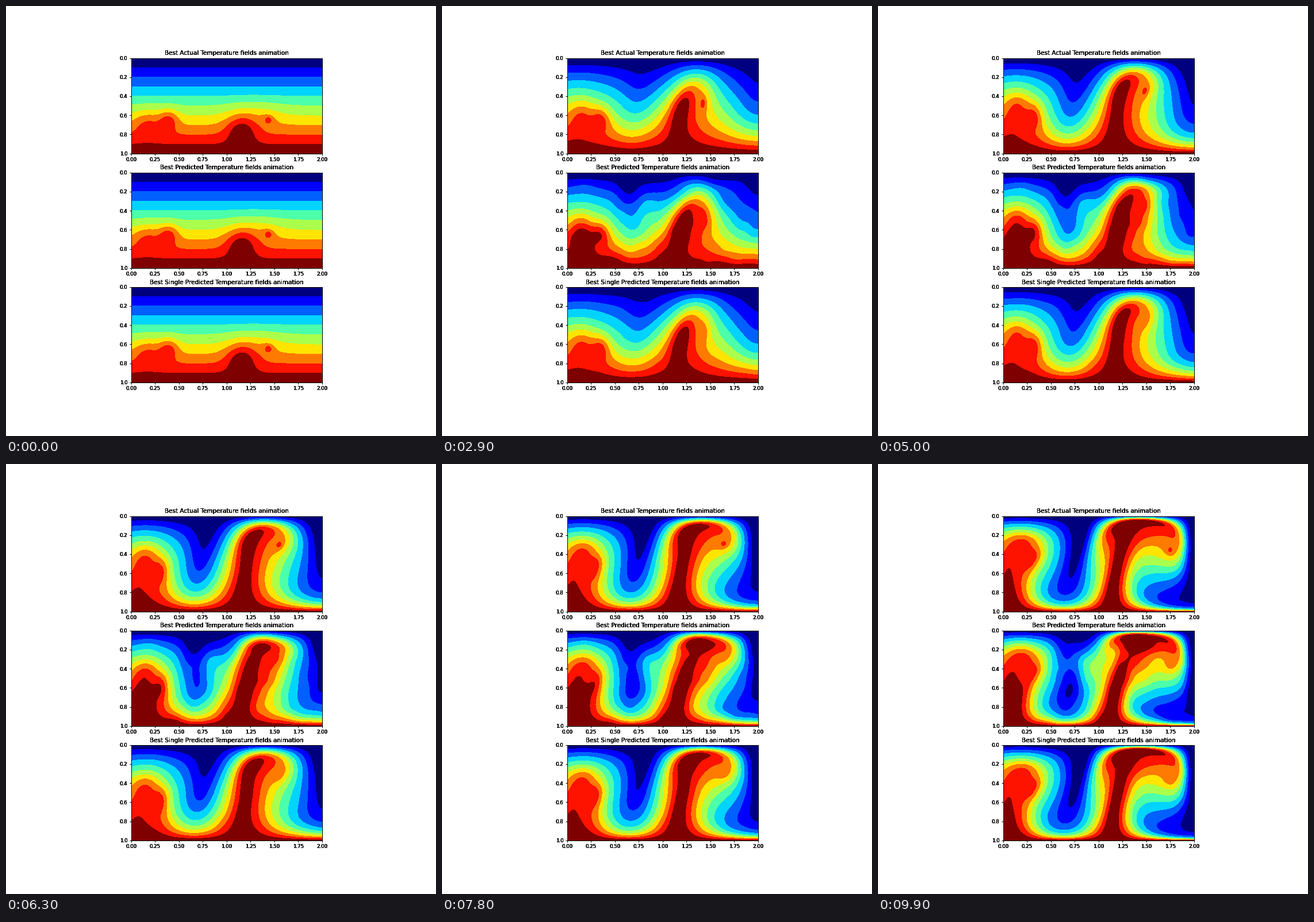
A matplotlib script for the animation above (10000 ms loop, 748x748 px).

```python
import numpy as np
import matplotlib.pyplot as plt
from matplotlib.animation import FuncAnimation
from matplotlib.colors import ListedColormap

SIZE, DPI = 748, 68
FRAMES, INTERVAL = 100, 100
DT = INTERVAL / 1000
NX, NY = 333, 166

xs = (np.arange(NX) + 0.5) * 2 / NX
ys = (np.arange(NY) + 0.5) / NY
X, Y = np.meshgrid(xs, ys)
EDGE = np.tanh(Y / 0.06) * np.tanh((1 - Y) / 0.04)
FINE = np.linspace(0, 2, 801)
TILT = 0.06


def jet(centre, width):
    return np.exp(-((FINE - centre) / width) ** 2 / 2)


def rising(t):
    """Upward speed across the box at mid depth, with zero mean."""
    up = ((0.032 + 0.004 * t) * jet(0.10, 0.20)
          - (0.050 + 0.005 * t) * jet(0.72, 0.15)
          + (0.106 + 0.002 * t) * jet(1.27, 0.16)
          - (0.090 + 0.006 * t) * jet(2.00, 0.20))
    return up - up.mean()


def velocity(x, y, t):
    """Flow of the stream function sin(pi y) F(x'), x' leaning with depth."""
    up = rising(t)
    flux = np.cumsum(up) * (FINE[1] - FINE[0])
    sin, cos = np.sin(np.pi * y), np.cos(np.pi * y)
    side = np.sin(np.pi * x / 2)
    lean = x - TILT * cos * side
    w = np.interp(lean, FINE, up)
    f = np.interp(lean, FINE, flux)
    u = np.pi * cos * f + sin * w * TILT * np.pi * sin * side
    v = -sin * w * (1 - TILT * np.pi / 2 * cos * np.cos(np.pi * x / 2))
    return u, v


def sample(fields, x, y):
    """Bilinear lookup of grid fields at the points x, y."""
    gx, gy = x * NX / 2 - 0.5, y * NY - 0.5
    i = np.clip(gx.astype(int), 0, NX - 2)
    j = np.clip(gy.astype(int), 0, NY - 2)
    fx, fy = gx - i, gy - j
    return [(f[j, i] * (1 - fx) + f[j, i + 1] * fx) * (1 - fy)
            + (f[j + 1, i] * (1 - fx) + f[j + 1, i + 1] * fx) * fy
            for f in fields]


def bump(x, y, cx, cy, sx, sy):
    return np.exp(-((x - cx) / sx) ** 2 / 2 - ((y - cy) / sy) ** 2 / 2)


def start_temp(x, y):
    """Linear profile with two hot spots on the left and a plume."""
    return (y
            + 0.21 * bump(x, y, 1.15, 0.74, 0.115, 0.11)
            + 0.07 * bump(x, y, 1.30, 0.58, 0.20, 0.10)
            + 0.08 * bump(x, y, 1.43, 0.64, 0.055, 0.055)
            + 0.19 * bump(x, y, 0.39, 0.64, 0.075, 0.08)
            + 0.14 * bump(x, y, 0.17, 0.67, 0.11, 0.10))


# Prediction errors: seconds to full size, and shape
ERRORS = [
    (3, 0.11 * bump(X, Y, 0.18, 0.68, 0.13, 0.16)),
    (3, -0.08 * bump(X, Y, 0.60, 0.25, 0.07, 0.15)),
    (3, 0.09 * bump(X, Y, 1.38, 0.50, 0.10, 0.20)),
    (8, 0.13 * bump(X, Y, 1.52, 0.17, 0.10, 0.06)),
    (10, 0.27 * bump(X, Y, 0.82, 0.33, 0.10, 0.14)),
    (10, -0.22 * bump(X, Y, 1.12, 0.25, 0.11, 0.13)),
    (10, -0.10 * bump(X, Y, 1.32, 0.78, 0.09, 0.14)),
]


def ripples(count, seed):
    rng = np.random.default_rng(seed)
    total = sum(rng.choice([-1, 1])
                * bump(X, Y, rng.uniform(0, 2), rng.uniform(0, 1),
                       rng.uniform(0.04, 0.09), rng.uniform(0.04, 0.09))
                for _ in range(count))
    return EDGE * total


ROUGH, FAINT = ripples(50, 4), ripples(50, 9)


def bands(temp):
    return np.clip(np.floor(temp * 10 + 1e-6), 0, 9).astype(np.uint8)


def panels(sx, sy, t):
    """Colour bands of the three panels; sx, sy is where the heat came from."""
    base = start_temp(sx, sy)
    inside = np.hypot(sx - 1.43, sy - 0.65) < 0.033 - 0.001 * t
    actual = np.where(inside, np.maximum(base, 0.85), base)
    guess = actual if t < 0.3 else base
    error = EDGE * sum(min(t / rise, 1) * shape for rise, shape in ERRORS)
    ramp = min(t / 1.5, 1)
    return (bands(actual),
            bands(guess + error + 0.03 * ramp * ROUGH),
            bands(guess + 0.006 * ramp * FAINT))


def simulate():
    sx, sy = X, Y
    result = []
    for n in range(FRAMES):
        t = n * DT
        result.append(panels(sx, sy, t))
        u, v = velocity(X, Y, t)
        u, v = velocity(X - u * DT / 2, Y - v * DT / 2, t + DT / 2)
        sx, sy = sample((sx, sy), X - u * DT, Y - v * DT)
    return result


fields = simulate()

plt.rcParams["font.family"] = "DejaVu Sans"
fig = plt.figure(figsize=(SIZE / DPI, SIZE / DPI), dpi=DPI, facecolor="white")
cmap = ListedColormap(plt.get_cmap("jet")(np.linspace(0, 1, 10)))
LEFT, TOP, WIDTH, HEIGHT, PITCH = 217.5, 90.5, 332.4, 166.2, 199.1
PT = 72 / DPI


def label(x, y, text, size, ha, va):
    # Stacked copies give the heavy, hard-edged lettering
    for _ in range(5):
        fig.text(x / SIZE, y / SIZE, text, fontsize=size * PT, ha=ha, va=va)


def make_panel(row, name):
    top = SIZE - TOP - row * PITCH
    bottom = top - HEIGHT
    ax = fig.add_axes([LEFT / SIZE, bottom / SIZE, WIDTH / SIZE, HEIGHT / SIZE])
    image = ax.imshow(fields[0][row], cmap=cmap, vmin=0, vmax=9,
                      extent=(0, 2, 1, 0), aspect="auto",
                      interpolation="nearest")
    xticks, yticks = np.linspace(0, 2, 9), np.linspace(0, 1, 6)
    ax.set_xticks(xticks)
    ax.set_yticks(yticks)
    ax.tick_params(length=3.03 * PT, width=PT,
                   labelbottom=False, labelleft=False)
    for spine in ax.spines.values():
        spine.set_linewidth(PT)
    for x in xticks:
        label(LEFT + x * WIDTH / 2, bottom - 6.06, f"{x:.2f}", 8.66,
              "center", "top")
    for y in yticks:
        label(LEFT - 6.06, top - y * HEIGHT, f"{y:.1f}", 8.66,
              "right", "center_baseline")
    label(LEFT + WIDTH / 2, top + 5.2,
          f"Best {name} Temperature fields animation", 10.39,
          "center", "baseline")
    return image


names = ("Actual", "Predicted", "Single Predicted")
images = [make_panel(row, name) for row, name in enumerate(names)]


def draw(n):
    for image, field in zip(images, fields[n]):
        image.set_data(field)
    return images


anim = FuncAnimation(fig, draw, frames=FRAMES, interval=INTERVAL,
                     repeat=True, repeat_delay=0)
plt.show()
```
